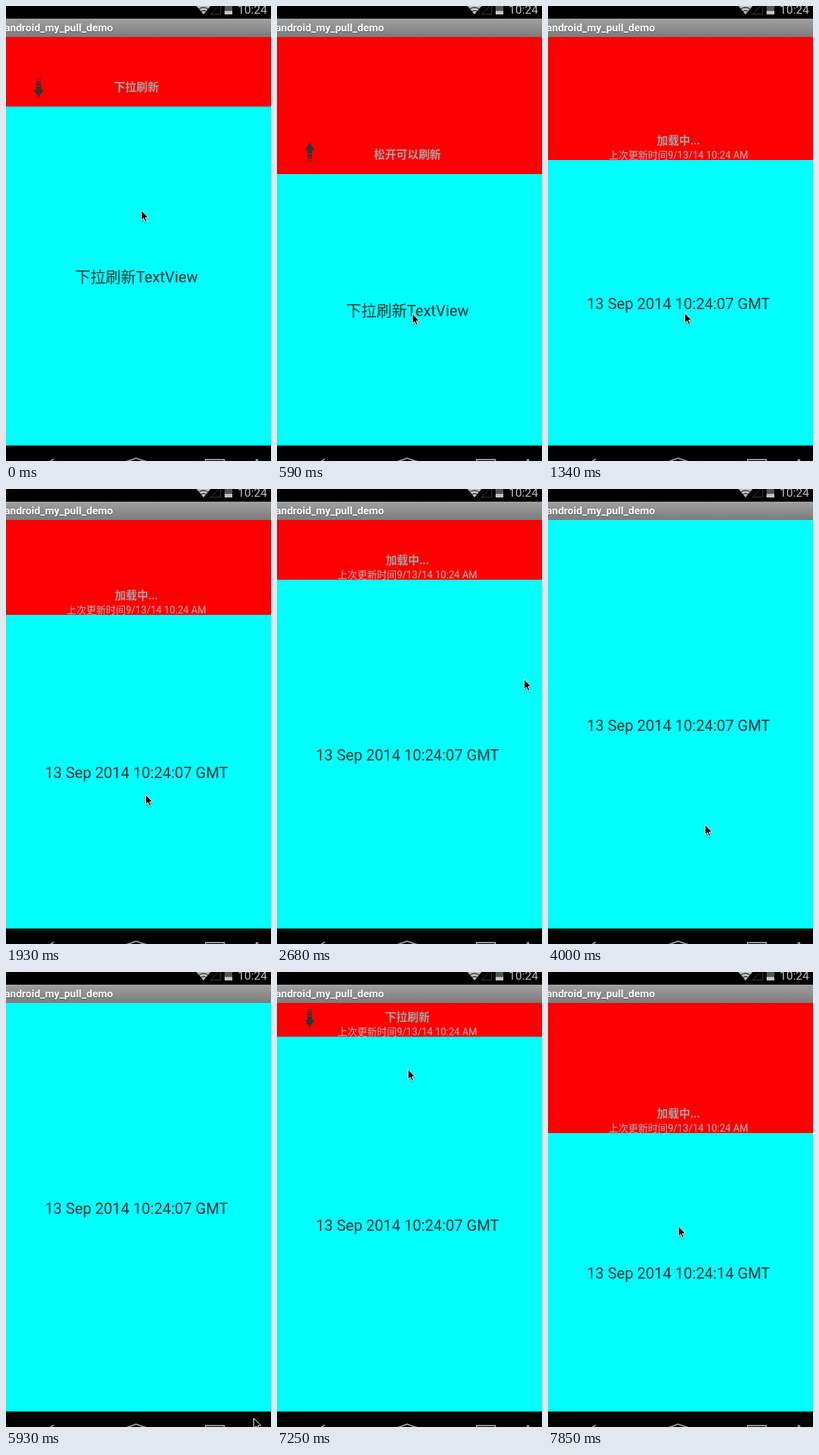
These frames come from a looping animation (377x647 px, 7.99 s). An HTML page:

```html
<!DOCTYPE html>
<html lang="zh-CN">
<head>
<meta charset="utf-8">
<title>Pull to refresh</title>
<style>
  html, body { margin: 0; width: 100%; height: 100%; overflow: hidden; background: #000; }
  svg { display: block; width: 377px; height: 647px; }
  text { font-family: Roboto, "Noto Sans CJK SC", "Noto Sans CJK", sans-serif; }
  .mid { text-anchor: middle; }
  #label { font-size: 15.9px; font-weight: 700; fill: #a4a4a4; }
  #updated { font-size: 14.05px; fill: #b4b4b4; }
  #content { font-size: 21.67px; fill: #263333; }
  #title { font-size: 15px; font-weight: 700; fill: #fff; text-anchor: end; text-shadow: 0 1px 1px #555; }
  #clock { font-size: 16.9px; fill: #bdbdbd; text-anchor: end; }
  #cursor { stroke: #fff; stroke-linejoin: round; filter: drop-shadow(0 1px 1px #0006); }
  .line { fill: none; stroke: #9a9a9a; stroke-width: 2; }
</style>
</head>
<body>
<svg viewBox="0 0 377 647">
  <defs>
    <linearGradient id="bar" x2="0" y2="1">
      <stop offset="0" stop-color="#a0a0a0"/>
      <stop offset="1" stop-color="#7c7c7c"/>
    </linearGradient>
  </defs>

  <rect y="44" width="377" height="581" fill="#f00"/>
  <g id="header">
    <g id="arrow" fill="#333">
      <path d="M-7 5H-3.5V0H3.5V5H7L0 16Z"/>
    </g>
    <text id="label" class="mid" x="185.5" y="-22.5"></text>
    <text id="updated" class="mid" x="185.5" y="-2.5">上次更新时间9/13/14 10:24 AM</text>
  </g>
  <rect id="page" width="377" height="581" fill="#0ff"/>
  <text id="content" class="mid" x="185.6"></text>

  <rect width="377" height="18"/>
  <rect y="18" width="377" height="26" fill="url(#bar)"/>
  <text id="title" x="152.2" y="36">android_my_pull_demo</text>

  <path d="M281 12L271 0H291Z" fill="#bdbdbd"/>
  <path d="M273.5 5Q281 -1 288.5 5M276 8.6Q281 4.4 286 8.6" fill="none" stroke="#000"/>
  <path d="M291 11.5H305.5V-3Z" fill="none" stroke="#3c3c3c"/>
  <path d="M311 0h11v7h-11z" fill="#555"/>
  <path d="M311 7h11v5h-11z" fill="#c4c4c4"/>
  <text id="clock" x="371.5" y="11">10:24</text>

  <rect y="625" width="377" height="22"/>
  <path class="line" d="M61 649L68 644M171 648L185 643L200 648M284 648V645H310.5V648"/>
  <circle cx="357" cy="646" r="2" fill="#9a9a9a"/>

  <path id="cursor" d="M0 0V14L3.3 11.2L5.6 16.5L7.9 15.5L5.6 10.4H10Z"/>
</svg>
<script>
const LOOP = 7990, TICKS = 54, TOP = 44, BOTTOM = 625;
const REST = 85;         // header height while loading
const RELEASE = 7, CLOSE = 19, CLOSED = 27, GRAB = 48, RELEASE_2 = 52;
const $ = id => document.getElementById(id);
const clamp = v => Math.min(1, Math.max(0, v));

// Pointer moves: [first tick, last tick, x, y]; it waits in between.
const MOVES = [
  [0, 4, 192, 437], [7, 13, 198, 434], [13, 18, 351, 270], [19, 27, 223, 477],
  [28, 30, 227, 528], [30, 35, 225, 223], [36, 40, 352, 634], [40, 42, 330, 510],
  [43, GRAB, 186, 64], [GRAB, RELEASE_2, 185, 361]
];

function pointer(tick) {
  let x = 192, y = 290;
  for (const [from, to, toX, toY] of MOVES) {
    const p = clamp((tick - from) / (to - from));
    x += (toX - x) * p;
    y += (toY - y) * p;
  }
  return [Math.round(x), Math.round(y)];
}

// Dragging moves the page by a share of the finger's way; it then falls back evenly.
function pulled(tick, y) {
  const drag = start => 0.653 * (y - start);
  const fall = since => Math.max(REST, 195 - 10 * (tick - since));
  if (tick < RELEASE) return drag(138);
  if (tick < CLOSE) return fall(RELEASE);
  if (tick < GRAB) return REST * clamp((CLOSED - tick) / (CLOSED - CLOSE));
  return tick <= RELEASE_2 ? drag(64) : fall(RELEASE_2);
}

const move = (id, x, y, turn = 0) =>
  $(id).setAttribute("transform", `translate(${x} ${y}) rotate(${turn})`);
const show = (id, on) => $(id).style.display = on ? "" : "none";

function draw(tick) {
  const [x, y] = pointer(tick);
  const pull = Math.round(pulled(tick, y));
  const edge = TOP + pull;
  const refreshed = tick >= RELEASE, again = tick > RELEASE_2;
  const loading = again || (refreshed && tick < GRAB);
  const ready = pull > 146;

  move("page", 0, edge);
  $("page").setAttribute("height", BOTTOM - edge);
  move("header", 0, edge);
  move("arrow", 46.5, -29, ready ? 180 : 0);
  show("arrow", !loading);
  show("updated", refreshed);
  $("label").textContent = loading ? "加载中..." : ready ? "松开可以刷新" : "下拉刷新";

  $("content").textContent = refreshed
    ? `13 Sep 2014 10:24:${again ? "14" : "07"} GMT` : "下拉刷新TextView";
  $("content").setAttribute("y", 343.5 + pull / 2);
  move("cursor", x + 0.5, y + 0.5);
}

// Stripes of the arrow's tail get thinner and paler away from the head.
for (let i = 0; i < 4; i++) {
  const stripe = document.createElementNS("http://www.w3.org/2000/svg", "path");
  stripe.setAttribute("d", `M-3.5 ${-4 - 3.1 * i}h7v${3 - 0.7 * i}h-7z`);
  stripe.setAttribute("opacity", 1 - 0.2 * i);
  $("arrow").append(stripe);
}

let last = -1;
function frame() {
  const t = performance.now() % LOOP;
  const tick = Math.min(TICKS - 1, Math.floor((t + 4) / (LOOP / TICKS)));
  if (tick !== last) draw(last = tick);
  requestAnimationFrame(frame);
}
frame();
</script>
</body>
</html>
```
